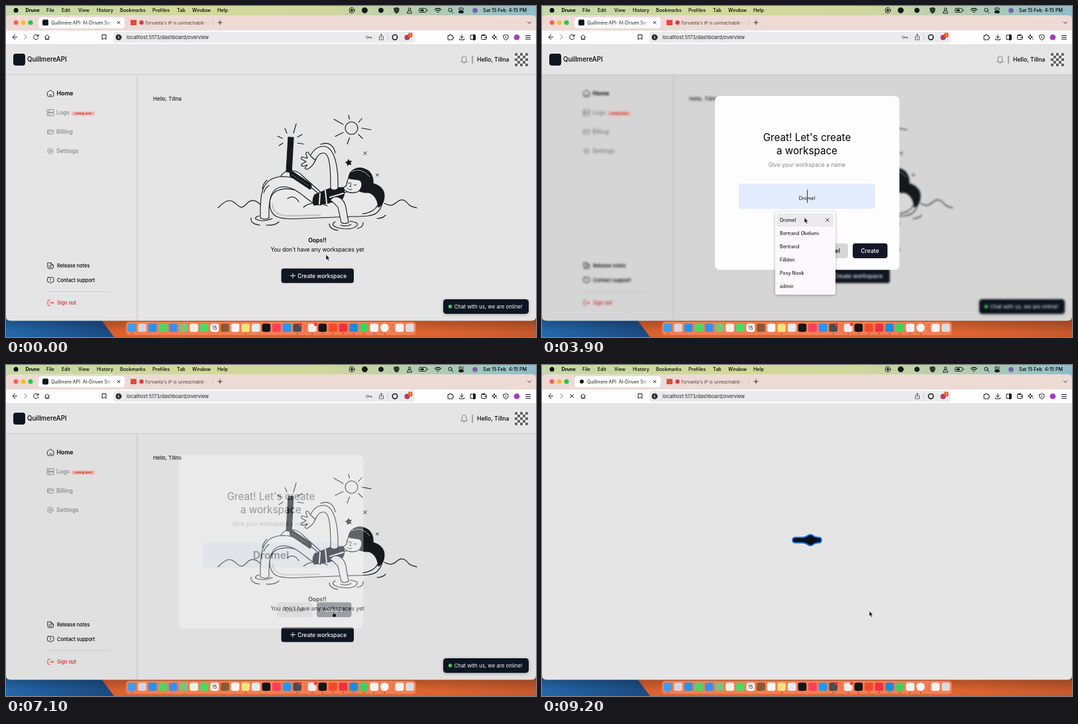
Recreate the animation shown at these times as an HTML page. Size 800 by 500 pixels, loop 9.3 s.

```html
<!DOCTYPE html>
<html lang="en">
<head>
<meta charset="utf-8">
<title>Create a workspace</title>
<style>
html, body { margin: 0; width: 100%; height: 100%; overflow: hidden; }
svg { display: block; width: 800px; height: 500px; font-family: Inter, sans-serif; }
.line { fill: none; stroke: #16191d; stroke-linecap: round; stroke-linejoin: round; }
.skin { fill: #e9e9e9; }
.mid { text-anchor: middle; }
.med { font-weight: 500; }
.bold { font-weight: 600; }
.grey { fill: #858585; }
</style>
</head>
<body>
<svg viewBox="0 0 800 500">
  <defs>
    <linearGradient id="bar">
      <stop offset="0" stop-color="#c3d9a6"/><stop offset=".35" stop-color="#d2d998"/>
      <stop offset=".6" stop-color="#cfd79c"/><stop offset=".82" stop-color="#aecbb4"/>
      <stop offset="1" stop-color="#8fbccb"/>
    </linearGradient>
    <linearGradient id="desk">
      <stop offset="0" stop-color="#c9582c"/><stop offset=".3" stop-color="#e0652f"/>
      <stop offset=".8" stop-color="#dd6430"/><stop offset="1" stop-color="#c4582c"/>
    </linearGradient>
    <linearGradient id="sea">
      <stop offset="0" stop-color="#2468ab"/><stop offset="1" stop-color="#1b4a80"/>
    </linearGradient>
    <linearGradient id="shade" x2="0" y2="1">
      <stop offset="0" stop-opacity=".28"/><stop offset="1" stop-opacity="0"/>
    </linearGradient>
    <linearGradient id="fade">
      <stop offset="0" stop-color="#fff" stop-opacity="0"/><stop offset="1" stop-color="#fff"/>
    </linearGradient>
    <linearGradient id="fade2">
      <stop offset="0" stop-color="#eddad5" stop-opacity="0"/><stop offset="1" stop-color="#eddad5"/>
    </linearGradient>
    <pattern id="check" x="768" y="71" width="8" height="8" patternUnits="userSpaceOnUse">
      <path d="M0 0h4v4h4v4H4V4H0z" fill="#626262"/>
    </pattern>
    <filter id="shadow" x="-20%" y="-20%" width="140%" height="140%">
      <feDropShadow dx="0" dy="1" stdDeviation="2" flood-opacity=".3"/>
    </filter>
  </defs>

  <!-- desktop and menu bar -->
  <rect width="800" height="500" fill="url(#desk)"/>
  <path d="M0 465H137L163 500H0z" fill="url(#sea)"/>
  <rect y="470" width="800" height="22" fill="url(#shade)"/>
  <rect width="800" height="22" fill="url(#bar)"/>
  <circle cx="15" cy="6.600" r="3.500"/>
  <g id="menu" font-size="7.200" class="med"></g>
  <g class="line" stroke-width="1">
    <circle cx="522" cy="6.500" r="4"/><circle cx="522" cy="6.500" r="1.600" fill="#16191d"/>
    <circle cx="541.500" cy="6.500" r="4" fill="#16191d"/>
    <circle cx="566" cy="6.500" r="3.500" fill="#16191d"/>
    <path d="M586 3.500l3.500-1 3.500 1v3q0 3-3.500 4.500-3.500-1.500-3.500-4.500z" fill="#343a34"/>
    <circle cx="609" cy="4.700" r="1.800"/><path d="M605.500 10.500q0-3.500 3.500-3.500t3.500 3.500z"/>
    <rect x="623.500" y="3.500" width="11" height="6" rx="1.800"/><path d="M625.500 6.500h5" stroke-width="3" stroke-linecap="butt"/><path d="M636.500 6v1"/>
    <path d="M647.500 5.500q4.500-4 9 0M649.300 7.500q2.700-2.300 5.400 0M651.500 9.500h1" stroke-width="1.300"/>
    <circle cx="670.500" cy="6" r="2.700"/><path d="M672.500 8l2.500 2.500"/>
    <rect x="683.500" y="3" width="7" height="3" rx="1.500"/><rect x="683.500" y="7.500" width="7" height="3" rx="1.500" fill="#16191d"/>
  </g>
  <circle cx="708" cy="6.700" r="3.800" fill="#7a5fae"/>

  <!-- browser window -->
  <path d="M0 58V20q0-6 6-6H794q6 0 6 6V58z" fill="#eddad5"/>
  <path d="M0 37H800V58H0z" fill="#fdfdfd"/>
  <path d="M0 58H800V469q0 6.500-7 6.500H7q-7 0-7-6.500z" fill="#e5e5e5"/>
  <path d="M0 58.300H800" stroke="#d8d6d6" stroke-width=".6"/>
  <circle cx="15" cy="25" r="3.600" fill="#fe5f57"/><circle cx="26" cy="25" r="3.600" fill="#febc2e"/><circle cx="37" cy="25" r="3.600" fill="#28c840"/>
  <rect x="49" y="17" width="130" height="16.500" rx="4" fill="#fff"/>
  <rect id="tabIcon" x="55" y="20.500" width="9" height="9" rx="2" fill="#0e1620"/>
  <circle id="tabLoad" cx="60" cy="25" r="3" fill="#111"/>
  <svg x="68" y="17" width="92" height="16"><text y="10.600" font-size="6.900" fill="#222">Quillmere API: AI-Driven Services</text></svg>
  <rect x="150" y="18" width="11" height="14" fill="url(#fade)"/>
  <rect x="188" y="21" width="9" height="8" fill="#df4b3f"/>
  <circle cx="204.500" cy="25" r="3.200" fill="#db3b3d"/>
  <svg x="209.500" y="17" width="97" height="16"><text y="10.600" font-size="6.700" fill="#4a4241">Torvanta's IP is unreachable - alert</text></svg>
  <rect x="297" y="18" width="10" height="14" fill="url(#fade2)"/>
  <rect x="162" y="39" width="455" height="16.500" rx="4" fill="#ebebed"/>
  <text x="182" y="50" font-size="7.400" fill="#222">localhost:5173/dashboard/overview</text>
  <g class="line" stroke-width="1">
    <path d="M168 23l4 4m0-4l-4 4M320 25h6m-3-3v6M787.500 24l2.500 2.500 2.500-2.500" stroke-width=".9"/>
    <path d="M312.500 21v8" stroke="#cdbab5" stroke-width=".8"/>
    <path d="M13.500 43.500L10 47l3.500 3.500M10.500 47h6"/>
    <path d="M28 44l3 3-3 3" stroke="#777"/>
    <path id="reload" d="M48.500 45a3.700 3.700 0 1 0 .4 3M49 43v2.500h-2.500"/>
    <path id="stop" d="M42.500 44.500l5 5m0-5l-5 5"/>
    <path d="M58.500 47L62 43.500l3.500 3.500M59.500 46.500v4h5v-4M62 50.500v-2"/>
    <path d="M145.500 43.500h5.500v7l-2.700-2-2.800 2z"/>
    <circle cx="170" cy="47.200" r="4" fill="#333"/>
    <path d="M170 46.800v2.300M170 45v.1" stroke="#fff"/>
    <g id="key" stroke="#555" stroke-width=".9"><circle cx="545.500" cy="47.300" r="1.800"/><path d="M547.500 47.300h4.500v1.500M550 47.300v1.300"/></g>
    <path d="M565 46h-1.500v5h6v-5H568M566.500 48.500V42.500l-1.700 1.700M566.500 42.500l1.700 1.700" stroke="#444" stroke-width=".8"/>
    <path d="M576.500 43v9" stroke="#cfcfcf"/>
    <circle cx="587" cy="47.200" r="3.700" stroke-width="1.600"/>
    <path d="M667.500 44.500h2a1.300 1.300 0 1 1 2.500 0h2v2a1.300 1.300 0 1 1 0 2.500v2h-6.500z"/>
    <path d="M688 43.500v5m-2.500-2.500l2.500 2.500 2.500-2.500M684.500 49.500v1.500h7v-1.500"/>
    <rect x="701.500" y="44" width="7" height="6.500"/><path d="M706.500 44v6.500" stroke-width="3"/>
    <rect x="717.500" y="44.500" width="7.500" height="6" rx="1"/><path d="M718 44l5-1M722.500 47.500h2.500"/>
    <path d="M737 43.500l1 2.500 2.500 1-2.500 1-1 2.500-1-2.500-2.500-1 2.500-1zM740.500 49.500l1 1"/>
    <path d="M751 44.500l3.500-1 3.500 1v3q0 2.500-3.500 4-3.500-1.500-3.500-4z"/><path d="M754.500 46.500v2"/>
    <path d="M784.500 44.500h7m-7 2.800h7m-7 2.800h7"/>
  </g>
  <circle cx="605.500" cy="47.500" r="4" fill="#b63a62"/>
  <rect x="607" y="40.500" width="6.500" height="7" rx="2" fill="#f2512d"/>
  <text x="610.200" y="46" font-size="5" fill="#fff" class="mid">1</text>
  <circle cx="771" cy="47.200" r="4.300" fill="#a33bc4"/>

  <!-- dashboard -->
  <g id="app">
    <g id="content">
      <path d="M198 104V475" stroke="#c6c6c6"/>
      <g class="line" stroke-width=".9">
        <path d="M62.500 130.500l4.700-3.500 4.700 3.500v4.500q0 1.800-1.800 1.800h-5.800q-1.800 0-1.800-1.800zM65.500 134.300h3.500"/>
        <g stroke="#8b8b8b">
          <rect x="62.500" y="156.500" width="9.500" height="4"/><rect x="62.500" y="161.700" width="9.500" height="4"/><path d="M64 158.500h2M64 163.700h2"/>
          <rect x="62.500" y="187" width="9" height="6.500" rx="1"/><path d="M62.500 189.300h9M64 191.500h2"/>
          <path d="M67 214.600l3.800 2.200v4.400L67 223.400l-3.800-2.200v-4.400z"/><circle cx="67" cy="219" r="1.600"/>
        </g>
        <path d="M63 388h5l3.500 3.500v3.500q0 1.800-1.800 1.800H64.800q-1.800 0-1.800-1.800zM68 388v3.500h3.500M65 392h2M65 394.500h4"/>
        <path d="M64 410h6.500q1.500 0 1.500 1.500v4q0 1.500-1.500 1.500h-1.500l-1.700 2-1.700-2H64q-1.500 0-1.500-1.500v-4q0-1.500 1.500-1.500zM67.300 412v2M67.300 415.300v.1"/>
        <path d="M66.500 444.300H65q-2 0-2 2v4q0 2 2 2h1.500M66.500 448.300h5m-1.800-1.800l1.800 1.800-1.800 1.800" stroke="#dc2626"/>
      </g>
      <text x="76.500" y="135.300" font-size="8.800" class="bold">Home</text>
      <g font-size="8.600" class="med grey">
        <text x="76" y="164.300">Logs</text><text x="76" y="193.200">Billing</text><text x="76" y="222.200">Settings</text>
      </g>
      <rect x="99" y="159.300" width="35" height="6.200" rx="1.500" fill="#f6b9b4"/>
      <text x="116.500" y="163.900" font-size="4.400" fill="#b3140f" class="mid med">coming soon</text>
      <g font-size="7.400" class="med">
        <text x="77" y="394.800">Release notes</text><text x="77" y="416.800">Contact support</text>
        <text x="77" y="450.900" fill="#dc2626">Sign out</text>
      </g>
      <path d="M62 431.500H157" stroke="#cfcfcf"/>
      <text x="222" y="142.700" font-size="7.800">Hello, Tillna</text>

      <!-- illustration -->
      <g class="line" stroke-width="1.150">
        <circle cx="521.500" cy="184.500" r="9.500"/>
        <path d="M517 165l1.500 6M537 170l-5 6M537 184.500l14 2.500M532 194l6 6M518.500 199l-3.500 9.500M509 191l-12 6M509 179l-14-8"/>
        <path d="M434 192l4-14M424 192l-3-7M417 200l-7-3.500M418 207l-6 4M440 198l7-4M440 207l9 1.500"/>
        <path d="M539.500 220l5 5m0-5l-5 5M558.500 253.500l4 3.500m0-3.500l-4 3.500" stroke-width=".9"/>
        <path d="M517 232l1.200 2.600 3.100-.2-2 2.400 1.500 2.700-3-.8-2.300 2-.2-3-2.600-1.400 2.900-1.200z" fill="#16191d"/>
        <path d="M320 305c9-9 16-15 25-8 7 6 10 11 18 2 7-8 14-6 21 1M571 298c8 4 12 4 18-1 9-8 14-3 19 3 5 5 8 3 12 5"/>
        <!-- float -->
        <path class="skin" d="M408 318c-13-7-14-31 1-39 18-8 38 2 57 11l80-15c20-1 30 22 14 37-7 6-20 6-38 6l-76 3c-15 1-29 1-38-3z"/>
        <path d="M402 300c1 10 7 16 22 17l50-1" stroke="#c5c5c5" stroke-width="2.500"/>
        <path d="M425 291q10-7 17 5M449 304q16-12 36-2M538 314q17-2 23-13"/>
        <!-- legs -->
        <path class="skin" d="M414 258c8-13 24-12 34-1l30 27-8 12z"/>
        <path class="skin" d="M384 320c-1-36 2-58 28-62 24-3 42 10 58 24l15 3-10 16c-20-2-30-26-55-28-21 0-24 20-23 47q-6 4-13 0z"/>
        <path d="M387 276q1-8 7-13M389 282q3-8 8-11"/>
        <path d="M426 198l8 .5-3 53-8-1z" fill="#16191d"/>
        <path d="M428 250q3-1 6 1l25 17q4 4 0 9l-30-20z" fill="#16191d"/>
        <path d="M432 255l24 16" stroke="#aaa" stroke-width=".8" stroke-dasharray="1.500 3"/>
        <!-- torso -->
        <path d="M466 285l24-10 19-1q4 8-1 17l-22 7-21 3q-4-8 1-16z" fill="#16191d"/>
        <path d="M474 283l-1 16M482 279l2 19M489 289l20-6" stroke="#e9e9e9" stroke-width="2"/>
        <!-- raised arm -->
        <path class="skin" d="M490 276c0-30-1-54-11-54-7 0-10 6-12 11l-8-6c4-8 10-15 20-15 17 0 23 31 22 64q-6 4-11 0z"/>
        <path class="skin" d="M460 227l-4-6q-4-1-3 3l2 6-8-2q-3 2 0 4l6 3-7 4q-1 3 3 3l6-2-4 5q2 3 5 1 8-5 11-13z"/>
        <path d="M475 209c12-5 20 2 22 13"/>
        <!-- head -->
        <path d="M517 260c1-12 13-18 24-14 10 3 14 13 13 22 10 3 17 9 17 19 0 9-4 15-9 17-1-12-6-19-14-22-12 0-22-4-25-14z" fill="#16191d"/>
        <path class="skin" d="M517 260c7 3 14 1 18 4 4 4 2 14-5 17-9 3-17 0-21-6l5-4q0-6 3-11z"/>
        <path d="M516 267q2 2 4 0M525 270q2 2 4 0M521 268l-2 5h2M515 275q3 4 7 2" stroke-width=".9"/>
        <path d="M522 250q15-7 27 8" stroke="#e9e9e9" stroke-width=".7"/>
        <!-- resting arm -->
        <path class="skin" d="M494 289c9-3 17 4 19 15l4 23q-6 3-11 0l-5-23q-6-7-12-11z"/>
        <!-- ripples -->
        <path d="M382 317q-7 2-5 5 11 5 25-1M370 320q-2 9 13 11M393 331q13 1 19-5M497 326q-9 5 4 9 22 5 29-4 3-4-11-6M488 329q0 8 13 10M530 336q10-2 9-9M505 331q9 3 16-1M560 321q8 0 13-5"/>
      </g>

      <text x="470" y="357" font-size="8.600" class="mid bold">Oops!!</text>
      <text x="470" y="370.500" font-size="8.450" class="mid">You don’t have any workspaces yet</text>
      <rect x="415.500" y="396.500" width="109.500" height="22" rx="3.500" fill="#101722"/>
      <path d="M429 407.500h8m-4-4v8" stroke="#fff" stroke-width=".9"/>
      <text x="440" y="410.600" font-size="8.500" fill="#fff" class="med">Create workspace</text>
      <rect x="660" y="443" width="129" height="22" rx="4.500" fill="#0d1520" filter="url(#shadow)"/>
      <circle cx="670.500" cy="454" r="2.800" fill="#4fc065"/>
      <text x="676.500" y="456.900" font-size="7.900" fill="#fff">Chat with us, we are online!</text>
    </g>
    <path id="dim" d="M0 104H800V469q0 6.500-7 6.500H7q-7 0-7-6.500z"/>

    <path d="M0 103.500H800" stroke="#c9c9c9"/>
    <rect x="11" y="72" width="18" height="18" rx="4" fill="#0e1620"/>
    <text x="32" y="84" font-size="9.700" class="med">QuillmereAPI</text>
    <path class="line" style="stroke:#777" stroke-width=".9" d="M687 84q1.500-1.500 1.500-5 0-3.500 3-3.500t3 3.500q0 3.500 1.500 5zM690 86h3"/>
    <path d="M704 75v12.500" stroke="#555" stroke-width=".9"/>
    <text x="711" y="84" font-size="8.700" class="med">Hello, Tillna</text>
    <rect x="768" y="71" width="20" height="20" rx="2" fill="#f2f2f2"/>
    <rect x="768" y="71" width="20" height="20" rx="2" fill="url(#check)"/>

    <g id="modal">
      <rect x="261" y="136" width="278.500" height="262.500" rx="7" fill="#fdfdfd"/>
      <g class="mid">
        <text x="400" y="204" font-size="15.200">Great! Let's create</text>
        <text x="400" y="224" font-size="15.200">a workspace</text>
        <text x="400" y="242.700" font-size="8.500" class="grey">Give your workspace a name</text>
        <rect id="field" x="297" y="268.500" width="206" height="38" rx="4" fill="#e2ecfc"/>
        <text id="value" x="400" y="293"></text>
        <rect x="409" y="358.500" width="53" height="22.500" rx="4" fill="#d6d6d7"/>
        <rect x="469" y="358.500" width="52.500" height="22.500" rx="4" fill="#141625"/>
        <g font-size="8.700" class="med">
          <text x="435.500" y="372.800">Cancel</text><text x="495" y="372.800" fill="#fff">Create</text>
        </g>
      </g>
      <path id="caret" d="M400.500 277.500v20" stroke="#222" stroke-width=".9"/>
      <g id="list">
        <path d="M355 311h6l4-3.500 4 3.500h71q3 0 3 3v119q0 3-3 3H355q-3 0-3-3V314q0-3 3-3z" fill="#fcf8fc" filter="url(#shadow)"/>
        <g id="hover">
          <rect x="354.500" y="313.500" width="85.500" height="20" rx="3.500" fill="#ece9ec"/>
          <path class="line" stroke-width=".9" d="M428.500 321l4.500 4.500m0-4.500l-4.500 4.500"/>
        </g>
        <g id="names" font-size="7.100" class="med" fill="#222"></g>
      </g>
    </g>
  </g>

  <path id="loader" fill="#0a1018" stroke="#1670e0" stroke-width="2" stroke-linejoin="round"/>

  <rect x="181" y="477" width="438" height="20" rx="5" fill="#f47d52"/>
  <g id="dock"></g>

  <g id="cursor">
    <path id="arrow" d="M0 0v8.300l1.900-1.700 1.300 3 1.500-.7-1.300-2.900h2.500z" fill="#111" stroke="#fff" stroke-width=".6"/>
    <path id="beam" class="line" d="M-1.500-1q1.500 0 1.500 1.200 0-1.200 1.500-1.200M0 0v7M-1.500 8q1.500 0 1.500-1.200 0 1.200 1.500 1.200M-1 3.800h2" stroke-width=".9"/>
    <path id="hand" d="M-.8 5V1q.8-1.400 1.600 0v2.700l3 .6q1 .4.8 1.700l-.8 3.500H-.2L-2.600 6.200q.3-1.200 1.800 0z" fill="#111" stroke="#fff" stroke-width=".6"/>
  </g>
</svg>
<script>
const LOOP = 9300, OPEN = 620, LIST = 2050, PICK = 4100, SUBMIT = 5800, CLOSE = 7000, RELOAD = 8000, BLANK = 8700;
const $ = id => document.getElementById(id);
const show = (id, on) => { $(id).style.display = on ? '' : 'none'; };
const clamp = v => Math.min(1, Math.max(0, v));
const label = (x, y, s, extra = '') => `<text x="${x}" y="${y}" ${extra}>${s}</text>`;

$('menu').innerHTML = label(29.5, 9.2, 'Drune', 'font-weight="700"') +
  Object.entries({ File: 61, Edit: 84, View: 109, History: 137, Bookmarks: 172, Profiles: 221, Tab: 258, Window: 281, Help: 319 })
    .map(([s, x]) => label(x, 9.2, s)).join('') + label(720, 9.2, 'Sat 15 Feb&#160; 4:15 PM');

const names = ['Dromel', 'Bertrand Okelumi', 'Bertrand', 'Fillden', 'Posy Nook', 'admin'];
$('names').innerHTML = names.map((s, i) => label(359, 326 + 20 * i, s)).join('');

const icons = ('3b9df0 d8d5dc 2f8fe8 4cd964 3a8df0 7cc47a f3efe6 4cd964 ffffff 8a5a30 f8f8f8 f8e27a ' +
  'e4ecf2 151515 f9415a 1e9af5 4b4b50 | f1edf2 151515 f04a2a f03040 1f8ad6 3fd160 f4f4f4 fafafa | f2f2f2 dcdcdc').split(' ');
let dockX = 190, dock = '';
icons.forEach((color, i) => {
  if (color === '|') {
    dock += `<path d="M${dockX - 4} 480v13" stroke="#c96242" stroke-width=".7"/>`;
    dockX += 7;
    return;
  }
  const round = i === 25 ? 6.3 : 3;
  dock += `<rect x="${dockX - 6.3}" y="479.7" width="12.6" height="12.6" rx="${round}" fill="#${color}"/>`;
  if (i === 8) dock += label(dockX, 489, '15', 'font-size="7" class="mid"');
  if ([0, 11, 16].includes(i) || i > 17 && i < 26) dock += `<circle cx="${dockX}" cy="495" r=".8" fill="#4a2114"/>`;
  if (i === 16 || i === 18) dock += `<circle cx="${dockX + 5}" cy="481" r="2.5" fill="#f33b35"/>`;
  dockX += 15.6;
});
$('dock').innerHTML = dock;

// time, x, y
const path = [[0, 483, 375.5], [200, 483, 375.5], [500, 484, 410], [1300, 484, 410], [1900, 434, 287.5],
  [2800, 434, 287.5], [3400, 396, 319.5], [4300, 396, 319.5], [5200, 494, 371.5], [LOOP, 494, 371.5]];

function pointer(t) {
  const i = path.findIndex(p => p[0] > t), [t0, x0, y0] = path[i - 1], [t1, x1, y1] = path[i];
  const u = (t - t0) / (t1 - t0), e = u * u * (3 - 2 * u);
  return [x0 + (x1 - x0) * e, y0 + (y1 - y0) * e];
}

// Capsule with a bulge travelling along it.
function blob(center) {
  const top = [], bottom = [];
  for (let x = 378; x <= 422; x += 1) {
    const end = Math.max(0, Math.abs(x - 400) - 18);
    const h = Math.sqrt(Math.max(0, 16 - end * end)) + 4.3 * Math.exp(-(((x - center) / 6) ** 2));
    top.push(`${x} ${264.5 - h}`);
    bottom.unshift(`${x} ${264.5 + h}`);
  }
  return `M${top.concat(bottom).join('L')}Z`;
}

function draw(t) {
  const [x, y] = pointer(t);
  const over = (l, tp, r, b) => x >= l && x <= r && y >= tp && y <= b;
  const modal = clamp((t - OPEN) / 150) * (1 - clamp((t - CLOSE) / 150));
  const open = modal > 0;

  show('app', t < BLANK);
  $('content').style.filter = open ? `blur(${1.8 * modal}px)` : 'none';
  $('dim').style.opacity = .065 * modal;
  show('modal', open);
  $('modal').style.opacity = modal;

  const listed = t >= LIST && t < PICK;
  const hover = listed && over(354, 313, 440, 333);
  const picked = t >= PICK;
  show('list', listed);
  show('hover', hover);
  show('field', hover || picked);
  const value = $('value');
  value.textContent = hover || picked ? names[0] : 'Workspace Name';
  value.setAttribute('font-size', hover ? 7.2 : 15.6);
  value.setAttribute('font-weight', hover ? 400 : picked ? 700 : 600);
  value.setAttribute('fill', hover || picked ? '#111' : '#d3d3d4');
  const focus = [OPEN, LIST, 3450, PICK].filter(s => s <= t).pop();
  show('caret', t < SUBMIT && (t - focus) % 1000 < 500);

  const loading = t >= RELOAD;
  show('reload', !loading);
  show('key', !loading);
  show('stop', loading);
  show('tabIcon', !loading);
  show('tabLoad', loading);
  show('loader', t >= BLANK);
  $('loader').setAttribute('d', blob(400 + 13 * Math.sin((t - BLANK) / 1150 * 2 * Math.PI)));

  const beam = open && over(297, 268, 503, 307);
  const hand = open ? over(409, 358, 462, 381) && !listed || over(469, 358, 522, 381)
    : t < OPEN && over(415, 396, 525, 419);
  show('beam', beam);
  show('hand', hand);
  show('arrow', !beam && !hand);
  $('cursor').setAttribute('transform', `translate(${x} ${y})`);
}

const start = performance.now();
(function tick() {
  draw((performance.now() - start) % LOOP);
  requestAnimationFrame(tick);
})();
</script>
</body>
</html>
```
